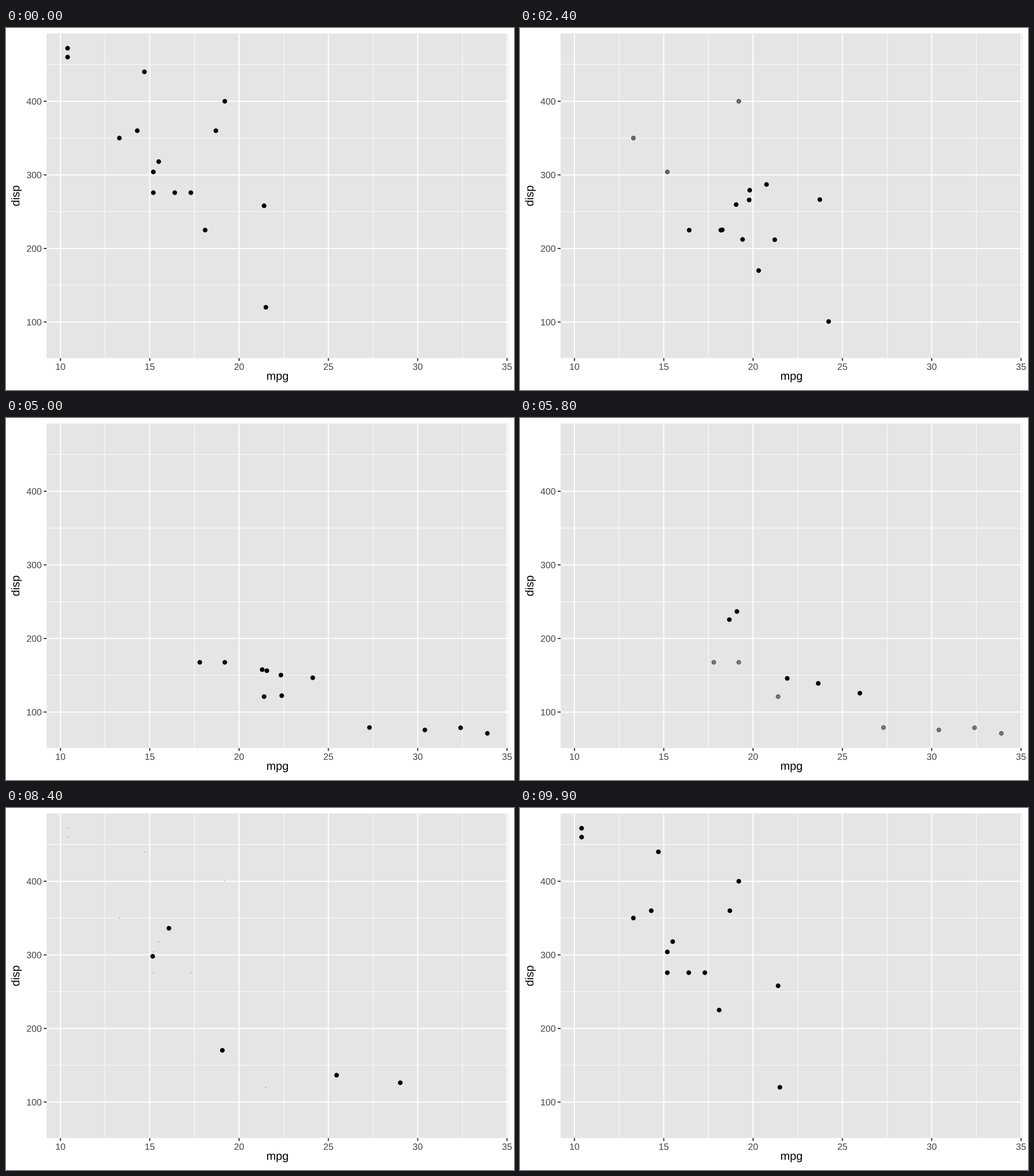
A matplotlib script that plays this animation: 885x632 px, repeating every 10 s.

```python
import matplotlib.pyplot as plt
import numpy as np
from matplotlib.animation import FuncAnimation
from matplotlib.patches import PathPatch, Rectangle
from matplotlib.textpath import TextPath
from matplotlib.transforms import Affine2D

W, H, DPI = 885, 632, 100
PT = 72 / DPI                      # points per pixel
FRAMES, STEP = 100, 100


def row(disp, *mpgs):
    """Dots that share one displacement."""
    return [(mpg, disp) for mpg in mpgs]


# Resting dots (mpg, disp) by number of gears; order decides who moves where
GEAR3 = (row(258, 21.4) + row(360, 18.7) + row(225, 18.1) + row(360, 14.3)
         + row(275.8, 16.4, 17.3, 15.2) + row(472, 10.4) + row(460, 10.4)
         + row(440, 14.7) + row(120.1, 21.5) + row(318, 15.5)
         + row(304, 15.2) + row(350, 13.3) + row(400, 19.2))
GEAR4 = (row(160, 21, 21) + row(108, 22.8) + row(146.7, 24.4)
         + row(140.8, 22.8) + row(167.6, 19.2, 17.8) + row(78.7, 32.4)
         + row(75.7, 30.4) + row(71.1, 33.9) + row(79, 27.3) + row(121, 21.4))
GEAR5 = (row(120.3, 26) + row(95.1, 30.4) + row(351, 15.8) + row(145, 19.7)
         + row(301, 15))

STATES = [np.array(g, float) for g in (GEAR3, GEAR4, GEAR5)]
REST, MOVE = 16, 17                # frames per pause and per move

RADIUS, EDGE = 3.45, 1.2           # dot size in pixels
PANEL, TICK, LABEL = "#e5e5e5", "#333333", "#444444"

plt.rcParams["font.family"] = "Liberation Sans"


def px(mpg):
    return 94.85 + (mpg - 10) * 31.12


def py(disp):
    return 127.9 + (400 - disp) * 1.285


LEFT, RIGHT = px(9.225), px(35.075)
TOP, BOTTOM = py(492.045), py(51.055)

fig = plt.figure(figsize=(W / DPI, H / DPI), dpi=DPI, facecolor="white")
ax = fig.add_axes([0, 0, 1, 1])
ax.set_xlim(0, W)
ax.set_ylim(H, 0)
ax.axis("off")


def line(x0, y0, x1, y1, color, width, z):
    ax.plot([x0, x1], [y0, y1], color=color, lw=width * PT, zorder=z,
            solid_capstyle="butt", snap=False)


def advance(text, size):
    """Width of a text including its side bearings."""
    def right(s):
        return TextPath((0, 0), s, size=size).get_extents().x1
    return right(text + "l") - right("l")


def label(x, y, text, size, color, align=0.5, angle=0):
    """Outlined text, placed on its baseline without rounding to pixels."""
    place = (Affine2D().translate(-align * advance(text, size), 0)
             .scale(1, -1).rotate_deg(-angle).translate(x, y))
    path = TextPath((0, 0), text, size=size).transformed(place)
    ax.add_patch(PathPatch(path, fc=color, ec="none", lw=0, snap=False,
                           zorder=4))


def draw_panel():
    ax.add_patch(Rectangle((LEFT, TOP), RIGHT - LEFT, BOTTOM - TOP,
                           fc=PANEL, ec="none", snap=False, zorder=0))
    for v in np.arange(12.5, 35, 5):
        line(px(v), TOP, px(v), BOTTOM, "white", 0.97, 1)
    for v in range(150, 500, 100):
        line(LEFT, py(v), RIGHT, py(v), "white", 0.97, 1)
    for v in range(10, 40, 5):
        line(px(v), TOP, px(v), BOTTOM, "white", 1.94, 2)
        line(px(v), BOTTOM, px(v), BOTTOM + 5, TICK, 1.94, 2)
        label(px(v), 596.8, str(v), 16, LABEL)
    for v in range(100, 500, 100):
        line(LEFT, py(v), RIGHT, py(v), "white", 1.94, 2)
        line(LEFT - 5, py(v), LEFT, py(v), TICK, 1.94, 2)
        label(62.3, py(v) + 5.8, str(v), 16, LABEL, align=1)
    label((LEFT + RIGHT) / 2, 614.3, "mpg", 20, "black")
    label(23.3, (TOP + BOTTOM) / 2, "disp", 20, "black", angle=90)


def pose(frame):
    """Positions, opacity and scale of every dot at a frame."""
    i, t = divmod(frame, REST + MOVE)
    old, new = STATES[i % 3], STATES[(i + 1) % 3]
    # the last move is one frame shorter so that the loop closes
    length = min(MOVE, FRAMES - 1 - i * (REST + MOVE) - REST)
    if i == len(STATES) or t <= REST:
        return old, np.ones(len(old)), np.ones(len(old))
    p = (t - REST) / length
    if p >= 1:
        return new, np.ones(len(new)), np.ones(len(new))
    n = min(len(old), len(new))
    moving = old[:n] + (new[:n] - old[:n]) * p
    leaving, entering = old[n:], new[n:]
    spots = np.vstack([moving, leaving, entering])
    alpha, scale = np.ones(len(spots)), np.ones(len(spots))
    alpha[n:n + len(leaving)] = 1 - p
    scale[n + len(leaving):] = p
    return spots, alpha, scale


draw_panel()
dots = ax.scatter([], [], zorder=3)


def update(frame):
    spots, alpha, scale = pose(frame)
    colors = np.zeros((len(spots), 4))
    colors[:, 3] = alpha
    dots.set_offsets(np.column_stack([px(spots[:, 0]), py(spots[:, 1])]))
    dots.set_sizes((2 * RADIUS * PT * scale) ** 2, fig.dpi)
    dots.set_linewidths(EDGE * PT * scale)
    dots.set_facecolor(colors)
    dots.set_edgecolor(colors)
    return [dots]


anim = FuncAnimation(fig, update, frames=FRAMES, interval=STEP,
                     repeat=True, repeat_delay=0, blit=False)
plt.show()
```
